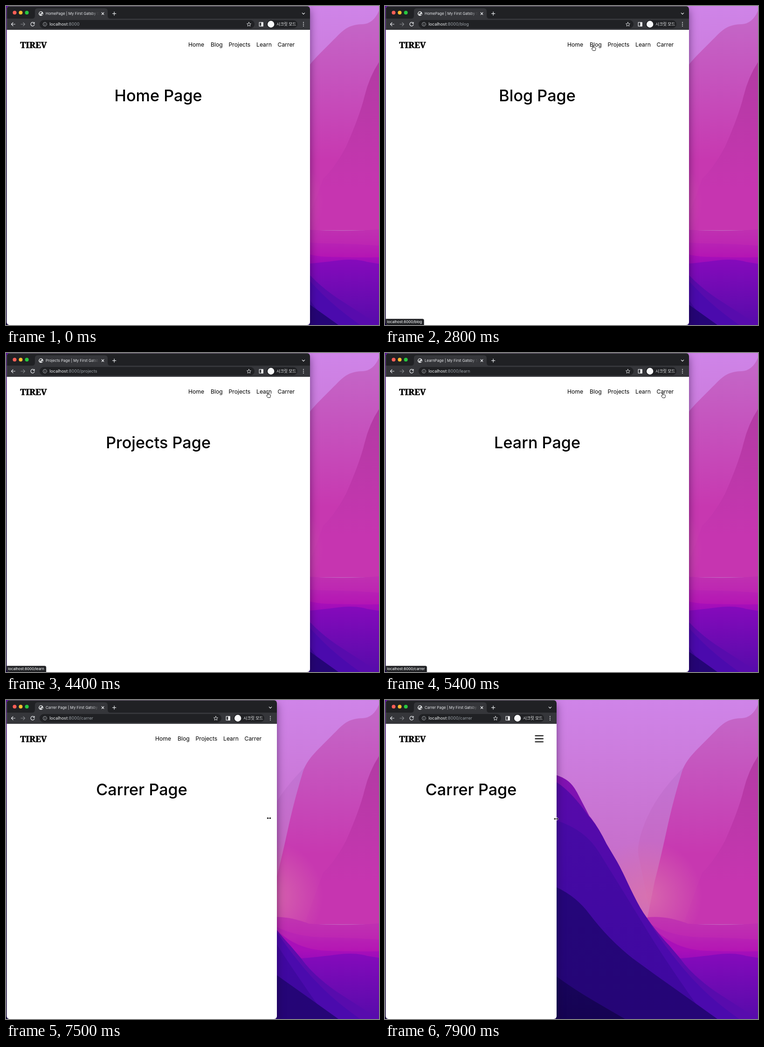
These frames come from a looping animation (800x683 px, 8000 ms). An HTML page:

```html
<!DOCTYPE html>
<html lang="ko">
<head>
<meta charset="utf-8">
<title>Page navigation</title>
<style>
  html, body { margin: 0; width: 100%; height: 100%; overflow: hidden; background: #26067a; }
  svg { display: block; width: 800px; height: 683px; }
  text { font-family: Inter, "Noto Sans CJK KR", "Noto Sans CJK", sans-serif; white-space: pre; }
  .line { fill: none; stroke: #e8eaed; stroke-width: 1.2; stroke-linecap: round; stroke-linejoin: round; }
  #shell { filter: drop-shadow(0 7px 9px rgba(20, 0, 40, .5)); }
  #nav text { font-size: 12.2px; }
  #logo { font: 900 18.5px "Noto Serif", serif; stroke: #000; stroke-width: .5; }
  #heading { font-size: 34.2px; font-weight: 500; text-anchor: middle; }
  #tabTitle { font-size: 8px; fill: #e8eaed; }
  #address { font-size: 9.1px; fill: #9aa0a6; }
  #address tspan:first-child { fill: #f1f3f4; }
  #status text { font-size: 7.75px; font-weight: 500; fill: #f1f3f4; }
</style>
</head>
<body>
<svg viewBox="0 0 800 683">
  <defs>
    <radialGradient id="glow" gradientUnits="userSpaceOnUse" cx="560" cy="420" r="120">
      <stop stop-color="#dc74ac" stop-opacity=".8"/><stop offset="1" stop-color="#dc74ac" stop-opacity="0"/>
    </radialGradient>
    <linearGradient id="tabFade">
      <stop stop-color="#35363a" stop-opacity="0"/><stop offset="1" stop-color="#35363a"/>
    </linearGradient>
    <clipPath id="tabClip"><path d="M84 8h115v16h-115z"/></clipPath>
    <clipPath id="windowClip"><rect id="clipRect" x="1.5" y=".5" height="682.5" rx="6"/></clipPath>
  </defs>
  <g id="wallpaper"></g>

  <rect id="shell" x="1.5" y=".5" height="682.5" rx="6" fill="#fff"/>
  <g clip-path="url(#windowClip)">
    <path d="M0 0h800v27H0z" fill="#202124"/>
    <path d="M0 27h800v24H0z" fill="#35363a"/>
    <path d="M0 .8h800" stroke="#55565a" stroke-width=".7"/>
    <path d="M56 27q6 0 6-6V11q0-6 6-6H212q6 0 6 6V21q0 6 6 6z" fill="#35363a"/>
    <circle cx="18.5" cy="14.3" r="4" fill="#ff5f57"/>
    <circle cx="31.5" cy="14.3" r="4" fill="#febc2e"/>
    <circle cx="44.7" cy="14.3" r="4" fill="#28c840"/>
    <circle cx="75" cy="16.3" r="4.8" fill="#f1f3f4"/>
    <path d="M71.5 14.5l3-2 2.500 1-1 2-2.500.5.5 2-1 1.500zM76 17l3-.5-.5 2-2 1.500z" fill="#35363a"/>
    <text id="tabTitle" x="85" y="19.2" clip-path="url(#tabClip)"></text>
    <path d="M182 8h17v16h-17z" fill="url(#tabFade)"/>
    <path class="line" d="M205.300 14l4.600 4.600m0-4.600l-4.600 4.600M228.500 16.300h7.400m-3.700-3.700v7.400"/>
    <path class="line" d="M19.500 39h-8m3.600-3.600L11.500 39l3.600 3.600M60 36.200a4 4 0 1 0 1 3.500M61 34.800v2.700h-2.800"/>
    <path class="line" d="M32 39h8.500m-3.600-3.600l3.600 3.600-3.600 3.600" style="stroke:#85878b"/>
    <rect id="omnibox" x="72" y="30" height="18" rx="9" fill="#202124"/>
    <path class="line" d="M87.500 39a4 4 0 1 1-8 0a4 4 0 1 1 8 0M83.500 38.800v2M83.500 37v.1" style="stroke:#b6b9bd;stroke-width:.9"/>
    <text id="address" x="93.300" y="42.300"><tspan>localhost</tspan><tspan>:8000</tspan><tspan id="route"></tspan></text>

    <g id="rightSide">
      <path class="line" d="M635.300 14.800l2.700 2.700 2.700-2.700"/>
      <path class="line" d="M521 34.800l1.300 2.900 3.100.3-2.300 2.100.7 3.100-2.800-1.600-2.800 1.600.7-3.100-2.300-2.100 3.100-.3z" style="stroke-width:.9"/>
      <path d="M543.200 35.200h8v8h-8z" class="line"/>
      <path d="M547.500 35h4v8.500h-4z" fill="#fff"/>
      <rect x="559" y="30.500" width="66" height="17" rx="8.500" fill="#202124"/>
      <circle cx="568.200" cy="39" r="7.200" fill="#f8f9fa"/>
      <text x="580" y="42.200" font-size="8.700" font-weight="500" fill="#f1f3f4">시크릿 모드</text>
      <g fill="#e8eaed"><circle cx="638" cy="35.300" r="1"/><circle cx="638" cy="39" r="1"/><circle cx="638" cy="42.700" r="1"/></g>
      <g id="nav"></g>
      <path id="burger" d="M606.500 76.500h16.500m-16.500 6.500h16.500m-16.500 6.500h16.500" stroke="#000" stroke-width="2.200" stroke-linecap="round"/>
    </g>
    <text id="logo" x="30.500" y="90">TIREV</text>
    <text id="heading" y="203.500"></text>
    <g id="status">
      <path id="statusBox" fill="#202124" stroke="#55565a" stroke-width=".6"/>
      <text x="4.300" y="679.300"></text>
    </g>
  </g>

  <g id="cursor" stroke-linejoin="round">
    <path id="arrow" d="M-3-5.500V4.200l2.300-2.100 1.500 3.500 1.800-.8-1.500-3.400h3.100z" fill="#000" stroke="#fff" stroke-width=".9"/>
    <path id="hand" d="M-2.200.5V-4.500q.9-1.400 1.800 0V-1.200q1-.8 1.700.1 1-.6 1.600.3 1.300-.4 1.500.8V2.200L3.300 5.500H-1.600L-4.400 1.400q.2-1.300 2.200-.9z" fill="#fff" stroke="#000" stroke-width=".9"/>
    <path id="resize" d="M-5 0l3-3v2h4v-2l3 3-3 3v-2h-4v2z" fill="#000" stroke="#fff" stroke-width=".8"/>
  </g>
</svg>
<script>
const $ = id => document.getElementById(id);
const set = (id, attrs) => { for (const k in attrs) $(id).setAttribute(k, attrs[k]); };
const show = (id, on) => { $(id).style.display = on ? '' : 'none'; };

// Back to front: outline, top colour, bottom colour, gradient start and end
const layers = [
  ['M0 0H800V683H0z', '#cf84e8', '#c468c2', 0, 430],
  ['M660 125Q590 190 563 250T545 340L570 460H680z', '#c274d4', '#ca60b8', 150, 460],
  ['M800 10Q788 38 765 39C730 39 718 58 700 75L668 107C646 130 641 142 637 153Q618 215 605 275T578 390L560 480H800z', '#c468c8', '#c738b0', 20, 330],
  ['M800 120Q779 152 769 193T730 300Q706 345 680 370L640 480H800z', '#b33ba4', '#c635b0', 130, 390],
  ['M430 300H690V560H430z', 'glow'],
  ['M560 466Q600 460 650 479Q730 484 800 478V683H560z', '#c033b1', '#bd26b2', 470, 510],
  ['M570 480Q615 507 680 508T800 513V683H570z', '#b824b4', '#b414b4', 505, 540],
  ['M575 487Q620 535 690 537T800 538V683H600z', '#a90fb9', '#9b0cba', 535, 555],
  ['M615 555Q680 549 710 545Q748 540 775 548L800 552V683H600z', '#850abb', '#560baa', 545, 683],
  ['M0 0L300 140Q349 151 368 161C392 169 402 180 412 198L438 248Q456 269 475 308L497 345C518 382 536 432 562 467Q585 500 610 526L632 552Q659 590 710 625L800 683H0z', '#8212b2', '#580bad', 165, 600],
  ['M0 20L368 176Q401 197 437 249Q456 269 475 308L497 345C518 382 536 432 562 467Q590 515 640 575T760 683H0z', '#560aa9', '#4b0aad', 180, 560],
  ['M0 150L368 258Q430 278 459 326Q515 416 560 490T690 683H0z', '#460aa4', '#3f08a0', 270, 610],
  ['M0 230L368 401Q411 421 439 459Q480 513 531 553L582 590Q650 638 713 683H0z', '#25067a', '#250576', 400, 683],
  ['M0 400L368 592Q405 619 446 643T515 683H0z', '#18045c', '#150352', 590, 683],
  ['M0 0H8V683H0z', '#5f10a5', '#14043e', 0, 300]
];
$('wallpaper').innerHTML = layers.map(([d, top, bottom, y1, y2], i) => bottom
  ? `<linearGradient id="g${i}" gradientUnits="userSpaceOnUse" x1="0" x2="0" y1="${y1}" y2="${y2}">
      <stop stop-color="${top}"/><stop offset="1" stop-color="${bottom}"/></linearGradient>
     <path d="${d}" fill="url(#g${i})"/>`
  : `<path d="${d}" fill="url(#${top})"/>`).join('');

const links = [['Home', 391], ['Blog', 439], ['Projects', 477.5], ['Learn', 537], ['Carrer', 582.5]];
$('nav').innerHTML = links.map(([name, x]) => `<text x="${x}" y="87.300">${name}</text>`).join('');

const pages = ['Home', 'Blog', 'Projects', 'Learn', 'Carrer'];
const routes = ['', '/blog', '/projects', '/learn', '/carrer'];
const titles = ['HomePage', 'Blog Page', 'Projects Page', 'LearnPage', 'Carrer Page'];

// Times at which each successive page takes over
const pageTimes = [2800, 3800, 4600, 5600];
const titleTimes = [3200, 4100, 5000, 6000];
const hoverTimes = [2600, 3400, 4300, 5100];

const path = [
  [1000, 645, 430], [1300, 540, 240], [1500, 445, 115], [1700, 417, 90], [1900, 414, 90],
  [2400, 414, 90], [2600, 445, 90], [3000, 450, 90], [3100, 450, 90], [3400, 479, 90],
  [3600, 490.5, 90.5], [4000, 490.5, 90.5], [4200, 535, 89], [4400, 563, 90], [4900, 563, 90],
  [5100, 590, 90], [5200, 590, 90], [5400, 597, 90.5], [5900, 597, 90.5], [6100, 635, 130],
  [6300, 679, 230], [6500, 667, 256.5], [6800, 657, 248], [7100, 653, 248], [7200, 653, 248],
  [7300, 640, 247.5], [7400, 640, 247.5], [7500, 564, 253], [7700, 440, 254], [7900, 367, 254.5]
];
const widths = [[7400, 652], [7500, 581], [7600, 515], [7700, 445], [7800, 394], [7900, 368]];

const countPast = (times, t) => times.filter(x => x <= t).length;
const clamp = x => Math.max(0, Math.min(1, x));

function sample(keys, t) {
  const next = keys.findIndex(k => k[0] > t);
  if (next < 0) return keys[keys.length - 1].slice(1);
  if (next === 0) return keys[0].slice(1);
  const a = keys[next - 1], b = keys[next], f = (t - a[0]) / (b[0] - a[0]);
  return a.slice(1).map((v, i) => v + (b[i + 1] - v) * f);
}

function drawWindow(t) {
  const [w] = sample(widths, t), page = countPast(pageTimes, t);
  set('shell', { width: w - 1.5 });
  set('clipRect', { width: w - 1.5 });
  set('omnibox', { width: w - 191 });
  set('rightSide', { transform: `translate(${w - 652})` });
  set('heading', { x: w / 2 + .6 });
  show('nav', w > 480);
  show('burger', w <= 480);
  $('heading').textContent = pages[page] + ' Page';
  $('route').textContent = routes[page];
  $('tabTitle').textContent = titles[countPast(titleTimes, t)] + ' | My First Gatsby Site';
}

function drawStatus(t) {
  const label = $('status').querySelector('text');
  label.textContent = 'localhost:8000' + routes[countPast(hoverTimes, t)];
  const right = label.getComputedTextLength() + 8.5;
  set('statusBox', { d: `M0 670H${right - 3}q3 0 3 3V684H0z` });
  $('status').style.opacity = clamp((t - 1800) / 400) * clamp((6400 - t) / 300);
}

function drawCursor(t) {
  const [x, y] = sample(path, t);
  const kind = t >= 6800 ? 'resize' : t >= 1600 && t < 6000 ? 'hand' : 'arrow';
  show('cursor', t >= 1000);
  for (const id of ['arrow', 'hand', 'resize']) show(id, id === kind);
  set('cursor', { transform: `translate(${x} ${y})` });
}

function frame() {
  const t = Math.floor(performance.now() % 8000 / 100) * 100; // ten steps a second
  drawWindow(t);
  drawStatus(t);
  drawCursor(t);
  requestAnimationFrame(frame);
}
frame();
</script>
</body>
</html>
```
